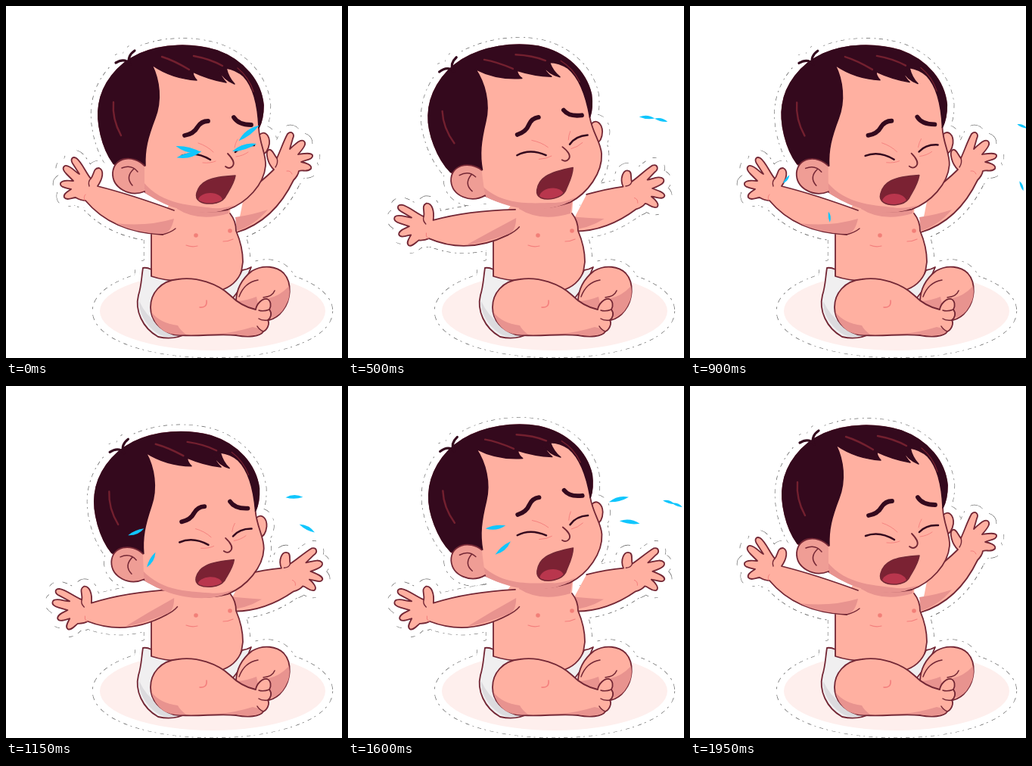
Animation of 444 by 465 pixels, one loop 2 s. Source, as an HTML page with a canvas:

```html
<!DOCTYPE html>
<html lang="en">
<head>
<meta charset="utf-8">
<title>Crying baby</title>
<style>
html, body { margin: 0; width: 100%; height: 100%; overflow: hidden; background: #fff; }
canvas { display: block; }
</style>
</head>
<body>
<canvas id="stage" width="444" height="465"></canvas>
<script>
const c = document.getElementById('stage').getContext('2d');
const SKIN = '#ffb0a1', SHADE = '#e8938f', EAR = '#ef9d95', LINE = '#732735', HAIR = '#34091d',
  GLOSS = '#73202f', BLUSH = '#f47f7d', DIAPER = '#f0eff0', TEAR = '#10c6fd';
const TAU = Math.PI * 2;

// Rises from 0 to 1 after `from` and falls back to 0 at `to`.
function pulse(t, from, to, ramp) {
  const u = Math.max(0, Math.min(1, (t - from) / ramp, (to - t) / ramp));
  return u * u * (3 - 2 * u);
}

// Turns a path around a joint; points nearer than `reach` turn less.
function bend(d, px, py, degrees, reach) {
  return d.replace(/([\d.]+) ([\d.]+)/g, (_, x, y) => {
    const dx = x - px, dy = y - py;
    const a = degrees * Math.PI / 180 * Math.min(1, Math.hypot(dx, dy) / reach);
    const cos = Math.cos(a), sin = Math.sin(a);
    return `${(px + dx * cos - dy * sin).toFixed(2)} ${(py + dx * sin + dy * cos).toFixed(2)}`;
  });
}

function place(x, y, degrees, draw, dy = 0, sy = 1) {
  c.save();
  c.translate(x, y + dy);
  c.rotate(degrees * Math.PI / 180);
  c.scale(1, sy);
  c.translate(-x, -y);
  draw();
  c.restore();
}

// The figure is drawn three times: broken rim, white border, then colour.
let pass = 0;
function border(path) {
  c.setLineDash(pass ? [] : [2, 4, 5, 5]);
  c.lineWidth = pass ? 19 : 20.2;
  c.strokeStyle = pass ? '#fff' : '#666';
  c.stroke(path);
  c.setLineDash([]);
  if (pass) { c.fillStyle = '#fff'; c.fill(path); }
}
function line(d, color = LINE, width = 1.8) {
  if (pass < 2) return;
  c.strokeStyle = color;
  c.lineWidth = width;
  c.stroke(new Path2D(d));
}
function fill(d, color) {
  if (pass < 2) return;
  c.fillStyle = color;
  c.fill(new Path2D(d));
}
function shape(d, color, outline = d) {
  if (pass < 2) return border(new Path2D(d));
  fill(d, color);
  line(outline);
}
function oval(x, y, rx, ry) {
  const p = new Path2D();
  p.ellipse(x, y, rx, ry, 0, 0, TAU);
  return p;
}
function spot(path, color) {
  if (pass < 2) return;
  c.fillStyle = color;
  c.fill(path);
}

function rightArm(k) {
  const swing = d => bend(d, 303, 251, 30 * k, 75);
  shape(swing('M315 248 Q338 232 354 216 C346 209 342 193 347 190 C352 188 354 197 358 201 ' +
    'C363 190 367 178 372 169 C377 164 382 169 379 175 L375 189 C381 184 387 176 393 178 ' +
    'C398 181 394 187 386 196 C393 195 403 193 405 197 C406 203 397 203 390 206 ' +
    'C396 207 405 210 403 215 C398 220 392 216 387 218 C386 224 383 227 380 230 Q354 284 305 299'), SKIN);
  fill(swing('M303 279 Q325 276 346 269 Q328 290 305 297Z'), SHADE);
  line(swing('M358 201 Q360 207 356 213'), LINE, 1.4);
  line(swing('M371 218 Q376 217 378 222'), BLUSH, 1);
}

function leftArm(k) {
  const swing = d => bend(d, 211, 278, -29 * k, 60);
  shape(swing('M222 270 Q165 249 121 238 C128 228 130 217 123 214 C115 214 117 222 112 228 ' +
    'C106 221 100 206 93 201 C87 198 85 203 88 208 L97 222 C92 220 84 209 78 211 C73 214 77 219 80 222 ' +
    'L89 231 C84 231 75 229 72 234 C71 239 77 240 86 242 C82 245 75 248 77 253 ' +
    'C80 257 86 254 92 253 C97 256 100 257 105 257 Q140 299 207 302'), SKIN);
  fill(swing('M145 287 Q185 292 222 281 Q218 300 207 301 Q170 300 145 287Z'), SHADE);
  line(swing('M207 302 Q218 299 224 294 M112 228 Q108 232 110 238'), LINE, 1.4);
  line(swing('M105 249 Q102 252 104 257'), BLUSH, 1);
}

function body() {
  shape('M212 268 L226 246 L298 246 L296 274 Q304 284 304 297 Q313 318 313 338 Q311 360 298 380 ' +
    'L250 372 Q215 368 192 357 L192 302 Z', SKIN,
    'M296 274 Q304 284 304 297 Q313 318 313 338 Q311 360 298 380 M192 302 L192 357');
  fill('M226 268 Q255 286 294 274 L298 246 L226 246Z', SHADE);
  spot(oval(251, 303, 2.8, 2.8), '#f27f78');
  spot(oval(296, 297, 2.8, 2.8), '#f27f78');
  line('M238 316 Q246 319 253 317 M287 311 Q294 311 300 308', BLUSH, 1.2);

  // Diaper
  shape('M312 349 Q319 348 324 345 Q317 365 298 388 L282 376 Q304 370 312 349Z', DIAPER);
  shape('M181 346 Q186 345 192 348 L192 357 Q210 363 230 363 L240 432 Q222 442 201 437 ' +
    'C180 425 170 402 175 382 C179 370 179 358 181 346Z', DIAPER);
  fill('M176 390 C175 408 190 430 208 436 Q222 439 236 433 Q194 428 176 390Z', '#dcdbde');

  // Back leg
  shape('M304 391 C304 376 311 361 325 350 C340 341 358 344 367 353 C379 366 376 389 366 402 ' +
    'Q358 413 347 415 L320 404Z', SKIN);
  fill('M374 370 Q362 383 347 386 L350 412 Q362 410 369 397 Q377 384 374 370Z', SHADE);
  fill('M305 390 Q319 389 331 384 L334 398 L318 403Z', SHADE);
  line('M308 384 Q315 365 333 362 M340 385 Q352 384 355 376', LINE, 1.5);

  // Front leg and foot
  shape('M191 398 C191 380 204 363 227 361 C252 357 280 367 296 382 Q311 397 330 401 ' +
    'C331 394 338 386 345 387 C350 389 351 396 348 401 C352 406 350 412 346 415 ' +
    'C349 420 345 428 340 430 C336 437 319 438 304 435 C280 432 248 438 221 434 C203 428 191 415 191 398Z', SKIN);
  fill('M192 404 Q203 419 227 422 Q230 428 238 434 Q219 436 208 429 Q195 419 192 404Z', SHADE);
  fill('M281 433 Q304 431 326 424 Q337 426 339 430 Q330 438 304 434Z', SHADE);
  line('M348 401 Q340 404 334 402 M346 415 Q338 416 334 413 M340 430 Q334 427 332 423', LINE, 1.5);
  line('M256 398 Q266 399 265 389', BLUSH, 1.6);
}

function mouth() {
  const lips = 'M252 249 C256 233 268 226 303 224 C301 237 294 246 289 256 C282 266 264 266 256 261 Q250 257 252 249Z';
  fill(lips, '#7b2233');
  c.save();
  c.clip(new Path2D(lips));
  spot(oval(270, 260, 16, 11), '#b9364d');
  c.restore();
  line(lips, LINE, 1.6);
}

function head(open) {
  const scalp = 'M142 208 C127 188 119 153 123 130 C127 104 146 77 177 63 C207 50 246 49 279 59 ' +
    'C315 72 337 100 340 131 Q340 149 334 161 ';
  const hair = scalp + 'C333 135 328 108 314 93 Q304 84 291 82 Q294 95 302 103 Q288 98 281 84 Q284 94 291 101 ' +
    'Q268 97 247 87 Q247 93 252 98 Q219 96 193 78 C203 98 206 125 197 148 C187 174 183 190 184 211Z';
  const tuft = 'M164 77 Q157 68 145 75 M163 76 Q160 66 170 59';

  shape('M335 170 C342 164 349 171 348 182 Q346 195 337 197Z', SKIN);
  shape(scalp + 'C335 183 344 195 343 211 C341 236 318 260 293 269 C260 276 220 269 184 246Z', SKIN);
  fill('M181 232 C207 264 247 263 273 267 Q288 268 302 263 Q287 273 264 273 C230 273 203 260 184 247Z', SHADE);
  fill(hair, HAIR);
  line(hair, HAIR, 1.5);
  line('M142 127 Q140 149 152 171 M206 67 Q222 72 242 84 M248 66 Q270 70 286 79', GLOSS, 2.4);
  line('M306 82 Q321 94 327 113', GLOSS, 1.4);
  line(tuft, HAIR, 3.2);
  if (pass < 2) border(new Path2D(tuft));

  // Left ear
  const ear = 'M183 211 C168 196 143 199 141 220 C140 240 163 253 183 245';
  shape(ear, EAR);
  line('M153 214 Q166 209 174 219 M169 215 Q157 226 167 237', LINE, 1.5);

  // Face
  line('M236 171 Q248 169 253 160 Q258 152 267 152 M301 147 Q307 157 324 157', HAIR, 5.8);
  line('M232 198 Q250 191 270 203 M303 193 Q312 183 328 184', HAIR, 2.5);
  line('M254 181 Q266 185 274 193 M260 207 Q270 208 277 205 M304 199 Q313 198 320 193 M306 176 Q303 181 302 187', BLUSH, .9);
  line('M293 195 C299 201 303 208 299 212 Q295 216 290 212');
  place(272, 224, 0, mouth, 0, open);
}

// Each tear flies along a curve: start, bend, end.
const CHEEK = [241, 189, 171, 172, 127, 229], JAW = [242, 196, 176, 213, 184, 279],
  TEMPLE = [321, 168, 370, 131, 439, 159], SIDE = [315, 187, 407, 158, 438, 238];

function tear([x0, y0, x1, y1, x2, y2], age) {
  if (age < 0 || age > 400) return;
  const s = 1 - (1 - age / 400) ** 1.7, r = 1 - s;
  const at = (a, b, d) => r * r * a + 2 * r * s * b + s * s * d;
  const slope = (a, b, d) => r * (b - a) + s * (d - b);
  const h = 17 - 10 * s, w = 8 - 4 * s;
  c.save();
  c.translate(at(x0, x1, x2), at(y0, y1, y2));
  c.rotate(Math.atan2(slope(y0, y1, y2), slope(x0, x1, x2)));
  fill(`M${-h} 0 Q0 ${-w} ${h} 0 Q0 ${w * .6} ${-h} 0Z`, TEAR);
  c.restore();
}
function tears(t) {
  for (const start of [0, 510])
    for (const curve of [CHEEK, JAW, TEMPLE, SIDE]) tear(curve, t - start);
  for (const start of [250, 310]) tear(TEMPLE, t - start);
}

function render(t) {
  const arm = pulse(t, 0, 400, 120) + pulse(t, 400, 900, 120);
  const tilt = pulse(t, 0, 950, 400);
  const dip = pulse(t, 0, 400, 200);
  const open = .92 - .08 * Math.sin(TAU * t / 1000);
  const ground = oval(273, 403, 149, 52);
  c.fillStyle = '#fff';
  c.fillRect(0, 0, 444, 465);
  c.lineJoin = 'round';
  for (pass = 0; pass < 3; pass++) {
    c.lineCap = pass ? 'round' : 'butt';
    if (pass < 2) border(ground);
    else spot(ground, '#feefed');
    rightArm(arm);
    body();
    leftArm(arm);
    place(222, 262, -7.7 * tilt, () => head(open), 10.5 * dip);
  }
  tears(t);
}

const start = performance.now();
function frame() {
  const t = Math.floor((performance.now() - start) / 50) * 50;
  render(t % 1000);
  requestAnimationFrame(frame);
}
frame();
</script>
</body>
</html>
```
